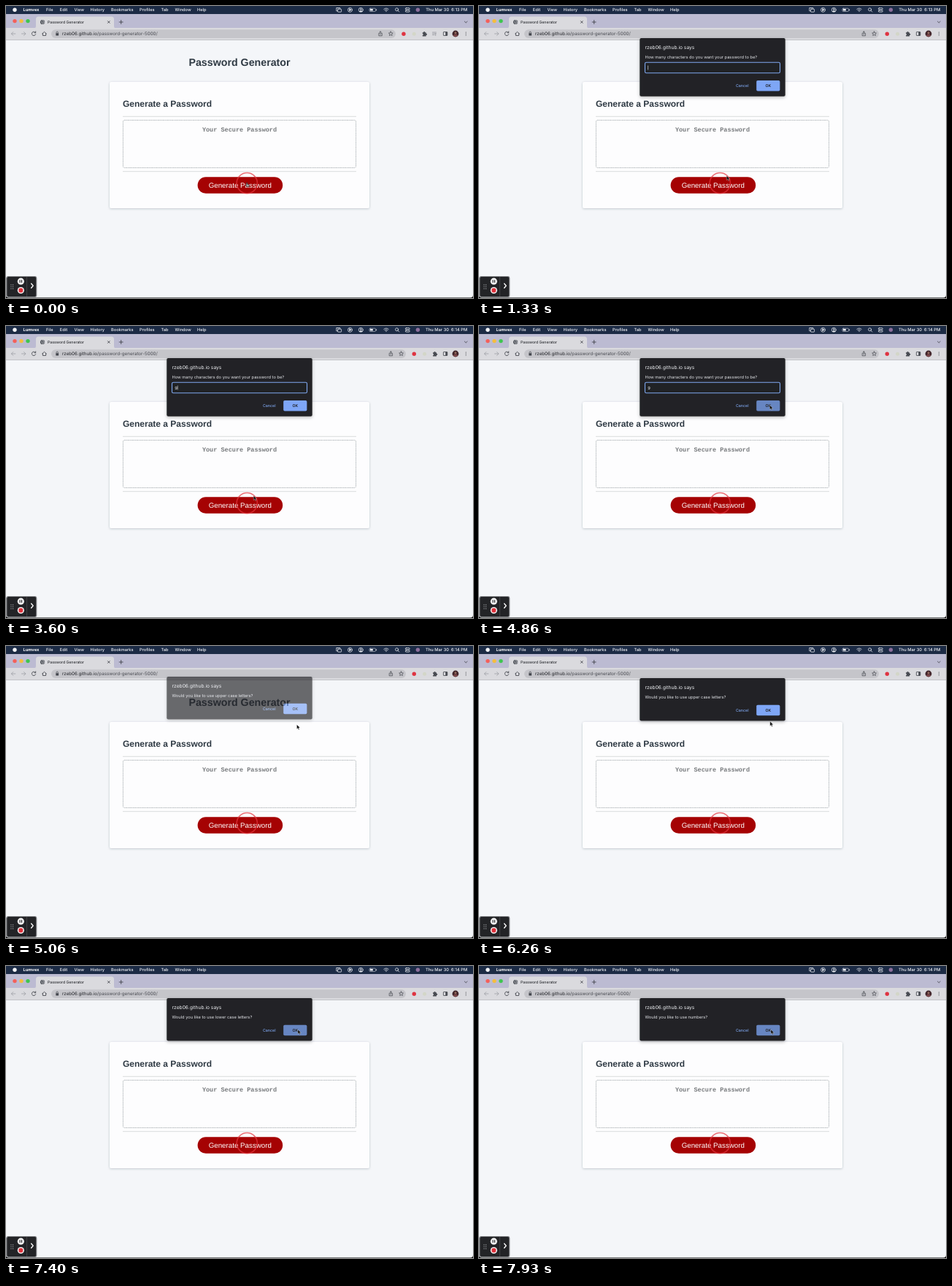
An HTML page for the animation above (8 s loop, 640 by 400 pixels).

```html
<!DOCTYPE html>
<html lang="en">
<head>
<meta charset="utf-8">
<title>Password Generator</title>
<style>
  html, body { margin: 0; width: 100%; height: 100%; overflow: hidden; background: #000; }
  svg { display: block; width: 100vw; height: 100vh; text-rendering: geometricPrecision; }
  text { font-family: Inter, Roboto, sans-serif; white-space: pre; }
  .page text { font-family: "Liberation Sans", Arial, sans-serif; }
  .page .mono { font-family: "Liberation Mono", monospace; }
  .line { fill: none; stroke-linecap: round; stroke-linejoin: round; }
</style>
</head>
<body>
<svg viewBox="0 0 640 400" xmlns="http://www.w3.org/2000/svg">
  <defs>
    <filter id="soft" x="-10%" y="-10%" width="120%" height="130%">
      <feDropShadow dx="0" dy=".8" stdDeviation="1.6" flood-color="#26323c" flood-opacity=".26"/>
    </filter>
    <filter id="deep" x="-10%" y="-20%" width="120%" height="150%">
      <feDropShadow dx="0" dy="1.5" stdDeviation="2.2" flood-color="#000" flood-opacity=".28"/>
    </filter>
  </defs>

  <g id="menu">
    <rect width="640" height="12" fill="#1c2b45"/>
    <circle cx="12" cy="5.2" r="2.7" fill="#f2f4f8"/>
    <g class="line" stroke="#eef1f6" stroke-width=".75">
      <path d="M454.5 6.8h-1.7v-4.3h5v1.3"/>
      <rect x="454.6" y="4.2" width="5" height="4" rx=".6"/>
      <circle cx="471.5" cy="5.3" r="3"/>
      <path d="M470.7 3.9v2.8l2.2-1.4z" fill="#eef1f6"/>
      <circle cx="486.3" cy="5.3" r="3"/>
      <path d="M484.6 7.2q1.7-1.8 3.4 0z" fill="#eef1f6"/>
      <circle cx="486.3" cy="4.4" r=".7" fill="#eef1f6"/>
      <rect x="498" y="3.2" width="8.6" height="4.3" rx="1.2" stroke-width=".5"/>
      <rect x="498.9" y="4.1" width="4" height="2.5" rx=".5" fill="#eef1f6" stroke="none"/>
      <path d="M507.6 4.7v1.3"/>
      <path d="M517.8 4.4q3.2-2.8 6.4 0M519 5.8q2-1.8 4 0M520.5 7.2h1"/>
      <circle cx="535.6" cy="4.8" r="2"/>
      <path d="M537.1 6.3l1.7 1.7"/>
      <rect x="547.3" y="2.7" width="6" height="2.2" rx="1.1"/>
      <rect x="547.3" y="5.9" width="6" height="2.2" rx="1.1"/>
    </g>
    <circle cx="564.4" cy="5.3" r="2.7" fill="#8c6f9c"/>
  </g>

  <g id="tabs">
    <rect y="11" width="640" height="20" fill="#bcbbd2"/>
    <path d="M38 30.5q3 0 3-3V18q0-3.5 3.5-3.5h100q3.5 0 3.5 3.5v9.500q0 3 3 3z" fill="#dadade"/>
    <circle cx="12" cy="20.6" r="2.7" fill="#f4605a"/>
    <circle cx="21" cy="20.6" r="2.7" fill="#f5bd3c"/>
    <circle cx="30" cy="20.6" r="2.7" fill="#3fc650"/>
    <circle cx="50" cy="22" r="3.100" fill="#4d5158"/>
    <path class="line" d="M48 20.5l1.4 1.3-.3 1.8M50.5 19.5l.3 1.4 1.4.6M50.6 24.3l.5-1.3 1.3-.3" stroke="#dadade" stroke-width=".7"/>
    <g class="line" stroke="#34373d" stroke-width=".8">
      <path d="M139.4 20.6l2.8 2.8m0-2.8l-2.8 2.8M155.2 22h5m-2.5-2.5v5M628.5 21.2l1.8 1.7 1.8-1.7"/>
    </g>
  </g>

  <g id="bar">
    <rect y="30" width="640" height="16.5" fill="#dadade"/>
    <path d="M0 46.3h640" stroke="#cdced4" stroke-width=".5"/>
    <rect id="pill" x="62" y="32.2" width="472" height="11.8" rx="5.9" fill="#c5c5ca"/>
    <g class="line" stroke-width=".85" stroke="#a0a1a8">
      <path d="M12.8 38H7.5m2.3-2.4L7.4 38l2.4 2.4M21.5 38h5.3m-2.3-2.4l2.4 2.4-2.4 2.4"/>
      <g stroke="#43464d">
        <path d="M40.3 36.3A2.7 2.7 0 1 0 40.7 38.7M40.7 34.9v1.8h-1.8"/>
        <path d="M49.6 38l2.9-2.6 2.9 2.6M50.4 37.5v3h4.2v-3"/>
        <path d="M69 37.3v-1a1.2 1.2 0 0 1 2.4 0v1" stroke-width=".7"/>
      </g>
    </g>
    <rect x="68.3" y="37.2" width="3.8" height="3.2" rx=".5" fill="#43464d"/>
    <g id="tools">
      <g class="line" stroke="#484b52" stroke-width=".75">
        <path d="M511.8 37.3h-.9v3.5h4.4v-3.5h-.9M513.1 39v-4m-1.200 1l1.2-1.2 1.2 1.2"/>
        <path d="M527.3 35l.9 1.9 2 .2-1.5 1.4.4 2-1.8-1-1.8 1 .4-2-1.5-1.4 2-.2z"/>
      </g>
      <circle cx="545" cy="38.3" r="2.7" fill="#df3542"/>
      <circle cx="559.3" cy="38.3" r="2.5" fill="#d3d6c8"/>
      <path d="M570.8 36.2h1.5a1 1 0 1 1 1.9 0h1.5v1.7a1 1 0 1 1 0 1.9v1.6h-4.9v-1.5a1 1 0 1 0 0-2z" fill="#484b52"/>
    </g>
    <path id="queue" class="line" d="M584.5 36h5m-5 1.8h5m-5 1.8h2.5m1.7 1v-2.8" stroke="#8d8f96" stroke-width=".7"/>
    <rect x="599.4" y="35.5" width="5.4" height="5" rx=".5" fill="none" stroke="#43464d" stroke-width=".8"/>
    <rect x="602.3" y="35.5" width="2.5" height="5" fill="#43464d"/>
    <circle cx="616" cy="38" r="4.4" fill="#40252b"/>
    <path d="M613 41q0-2.6 3-2.6t3 2.6q-3 2-6 0z" fill="#7a4649"/>
    <circle cx="616" cy="36.7" r="1.5" fill="#936a5e"/>
    <g fill="#43464d"><circle cx="630.3" cy="36" r=".6"/><circle cx="630.3" cy="38" r=".6"/><circle cx="630.3" cy="40" r=".6"/></g>
  </g>

  <g class="page">
    <path d="M0 46.5h640V396q0 3.5-3.5 3.5h-633Q0 399.5 0 396z" fill="#f4f6f9"/>
    <text x="320" y="82" font-size="14.22" font-weight="700" text-anchor="middle" fill="#2f3a44">Password Generator</text>
    <rect x="142" y="104" width="356" height="173" rx="2.5" fill="#fdfdfe" filter="url(#soft)"/>
    <text x="160" y="138.2" font-size="12" font-weight="700" fill="#2f3a44">Generate a Password</text>
    <path d="M160 151.3h320M160 226.7h320" stroke="#d6d8db" stroke-width=".9"/>
    <rect x="160.4" y="156.4" width="319.2" height="65.2" rx="2" fill="#fdfdfe" stroke="#b3b8bc" stroke-width=".9" stroke-dasharray="1.8 .6"/>
    <text class="mono" x="320" y="171.8" font-size="8.53" font-weight="700" text-anchor="middle" fill="#777a7d">Your Secure Password</text>
    <rect x="262.6" y="234.2" width="116.6" height="22.6" rx="11.3" fill="#a50203"/>
    <text x="320.8" y="249" font-size="9.78" text-anchor="middle" fill="#fff">Generate Password</text>
    <circle cx="330.3" cy="242.6" r="14.1" fill="none" stroke="#e4363f" stroke-opacity=".7" stroke-width="1.6"/>
  </g>

  <g id="recorder">
    <rect x=".8" y="370.5" width="41" height="28" rx="2.5" fill="#232427" stroke="#85878a" stroke-width="1.1"/>
    <path d="M28.5 371v27" stroke="#4b4d51" stroke-width=".7"/>
    <g id="grip" fill="#a9abaf"></g>
    <circle cx="20.3" cy="377.2" r="4.6" fill="#f4f4f5"/>
    <path d="M19.1 375.3v3.8m2.4-3.8v3.8" stroke="#232427" stroke-width="1.1"/>
    <circle cx="20.3" cy="389.5" r="4.6" fill="#f4f4f5"/>
    <rect x="17.4" y="386.6" width="5.8" height="5.8" rx="2" fill="#e0303a"/>
    <path class="line" d="M34.6 380.2l2.6 3-2.6 3" stroke="#fff" stroke-width="1.3"/>
  </g>

  <g id="dialogs"></g>

  <path id="arrow" d="M0 0v6.2l1.45-1.35 1 2.25 1.05-.45-1-2.2h1.95z" fill="#111" stroke="#fff" stroke-width=".3"/>
  <path id="hand" d="M0 .2q.6-.6 1.100 0v2l2 .4q.7.3.6 1l-.4 2H.5L-1.2 3.500q.2-.8 1.200 0z" fill="#aaa" stroke="#222" stroke-width=".6"/>
</svg>
<script>
const LOOP = 8000, FPS = 15;
const HOST = "rzeb06.github.io";
const $ = id => document.getElementById(id);

function add(parent, tag, attrs, text) {
  const el = document.createElementNS("http://www.w3.org/2000/svg", tag);
  for (const k in attrs) el.setAttribute(k, attrs[k]);
  if (text) el.textContent = text;
  parent.appendChild(el);
  return el;
}
const label = (parent, x, y, size, fill, text, more) =>
  add(parent, "text", { x, y, "font-size": size, fill, ...more }, text);

// Menu bar, tab and address texts
label($("menu"), 23.5, 7.3, 5.7, "#fff", "Lumvex", { "font-weight": 700 });
const items = { File: 55, Edit: 73.8, View: 93.5, History: 115.5, Bookmarks: 144, Profiles: 183, Tab: 212.5, Window: 231.5, Help: 262 };
for (const name in items) label($("menu"), items[name], 7.3, 5.7, "#f4f6fa", name, { "font-weight": 500 });
const clock = label($("menu"), 632.3, 7.3, 5.8, "#f4f6fa", "", { "text-anchor": "end", "font-weight": 500 });
label($("tabs"), 57, 24, 5.15, "#2a2c31", "Password Generator", { "font-weight": 500 });
const url = label($("bar"), 77, 40.1, 6.22, "#222429", HOST);
add(url, "tspan", { fill: "#484a51" }, "/password-generator-5000/");
for (let i = 0; i < 6; i++)
  add($("grip"), "circle", { cx: 7 + i % 2 * 2.6, cy: 382 + (i >> 1) * 2.6, r: .65 });

function makeDialog(open, close, message, hasInput) {
  const root = add($("dialogs"), "g", {});
  const top = hasInput ? 102 : 80.7;
  add(root, "rect", { x: 220.3, y: 44, width: 199.4, height: top - 22.2, rx: 2, fill: "#202225", filter: "url(#deep)" });
  label(root, 227.6, 58.8, 6.67, "#eceef1", HOST + " says");
  label(root, 227.5, 71.7, 5.72, "#e2e4e8", message);
  const d = { open, close, root, top };
  if (hasInput) {
    add(root, "rect", { x: 227.5, y: 77.3, width: 185, height: 14.4, rx: 1.8, fill: "#202225", stroke: "#7fa8ee", "stroke-width": 1.1 });
    d.value = label(root, 231.2, 86.6, 5.7, "#eceef1", "");
    d.caret = add(root, "path", { stroke: "#eceef1", "stroke-width": .6 });
  }
  label(root, 360.7, top + 9.3, 5.3, "#7fa7f0", "Cancel", { "text-anchor": "middle", "font-weight": 500 });
  d.ok = add(root, "rect", { x: 380.2, y: top, width: 32.2, height: 14.6, rx: 1.8 });
  label(root, 396.3, top + 9.3, 5.3, "#202225", "OK", { "text-anchor": "middle", "font-weight": 600 });
  return d;
}
const dialogs = [
  makeDialog(60, 4920, "How many characters do you want your password to be?", true),
  makeDialog(4970, 6590, "Would you like to use upper case letters?"),
  makeDialog(6665, 7500, "Would you like to use lower case letters?"),
  makeDialog(7570, 9000, "Would you like to use numbers?")
];

// Pointer stops: time, x, y
const stops = [
  [0, 329.6, 242], [770, 329.6, 242], [1060, 339.3, 232.4], [3870, 339.3, 232.4],
  [4730, 398.4, 108.2], [5000, 398.4, 108.2], [5200, 398.7, 106.8],
  [6200, 398.7, 106.8], [6540, 399.3, 87], [7200, 399.3, 87], [7500, 400, 87], [LOOP, 400, 87]
];
const clamp = v => Math.max(0, Math.min(1, v));
const between = (t, a, b) => t >= a && t < b;

// A hand speeds up early and slows down near its goal
const reach = p => 1 - (1 - p) ** 3 * (1 + 3 * p);

function pointer(t) {
  let i = 0;
  while (i < stops.length - 2 && t >= stops[i + 1][0]) i++;
  const [a, b] = [stops[i], stops[i + 1]];
  const e = reach(clamp((t - a[0]) / (b[0] - a[0])));
  return [a[1] + (b[1] - a[1]) * e, a[2] + (b[2] - a[2]) * e];
}

// The caret shows for the first half of each second, counted from 130 ms
const caretOn = t => (t - 130 + LOOP) % 1000 < 500;

function draw(t) {
  const [x, y] = pointer(t), early = t < 395;
  $("hand").style.display = early ? "" : "none";
  $("arrow").style.display = early ? "none" : "";
  $(early ? "hand" : "arrow").setAttribute("transform", `translate(${x} ${y})`);

  const wide = t >= 330;
  $("queue").style.display = wide ? "none" : "";
  $("tools").setAttribute("transform", `translate(${wide ? 14.3 : 0} 0)`);
  $("pill").setAttribute("width", wide ? 486 : 472);
  clock.textContent = `Thu Mar 30  6:${t < 2930 ? 13 : 14} PM`;

  for (const d of dialogs) {
    const rise = 1 - (1 - clamp((t - d.open) / 230)) ** 2;
    const alpha = rise * (1 - clamp((t - d.close) / 130));
    d.root.style.display = alpha > 0 ? "" : "none";
    d.root.setAttribute("opacity", alpha);
    d.root.setAttribute("transform", `translate(0 ${-6 * (1 - rise)})`);
    const hover = t > d.open + 300 && between(x, 380, 412.5) && between(y, d.top, d.top + 14.6);
    d.ok.setAttribute("fill", hover ? "#6786c2" : "#7ea6f6");
    if (d.value) {
      const typed = t >= 3395;
      d.value.textContent = typed ? "9" : "";
      d.caret.setAttribute("d", `M${typed ? 235.2 : 231.6} 81.6v5.8`);
      d.caret.style.display = caretOn(t) ? "" : "none";
    }
  }
}

const start = performance.now();
function tick(now) {
  const t = Math.max(0, now - start) % LOOP;
  draw(Math.floor((t + 7) * FPS / 1000) * 1000 / FPS);
  requestAnimationFrame(tick);
}
draw(0);
requestAnimationFrame(tick);
</script>
</body>
</html>
```
